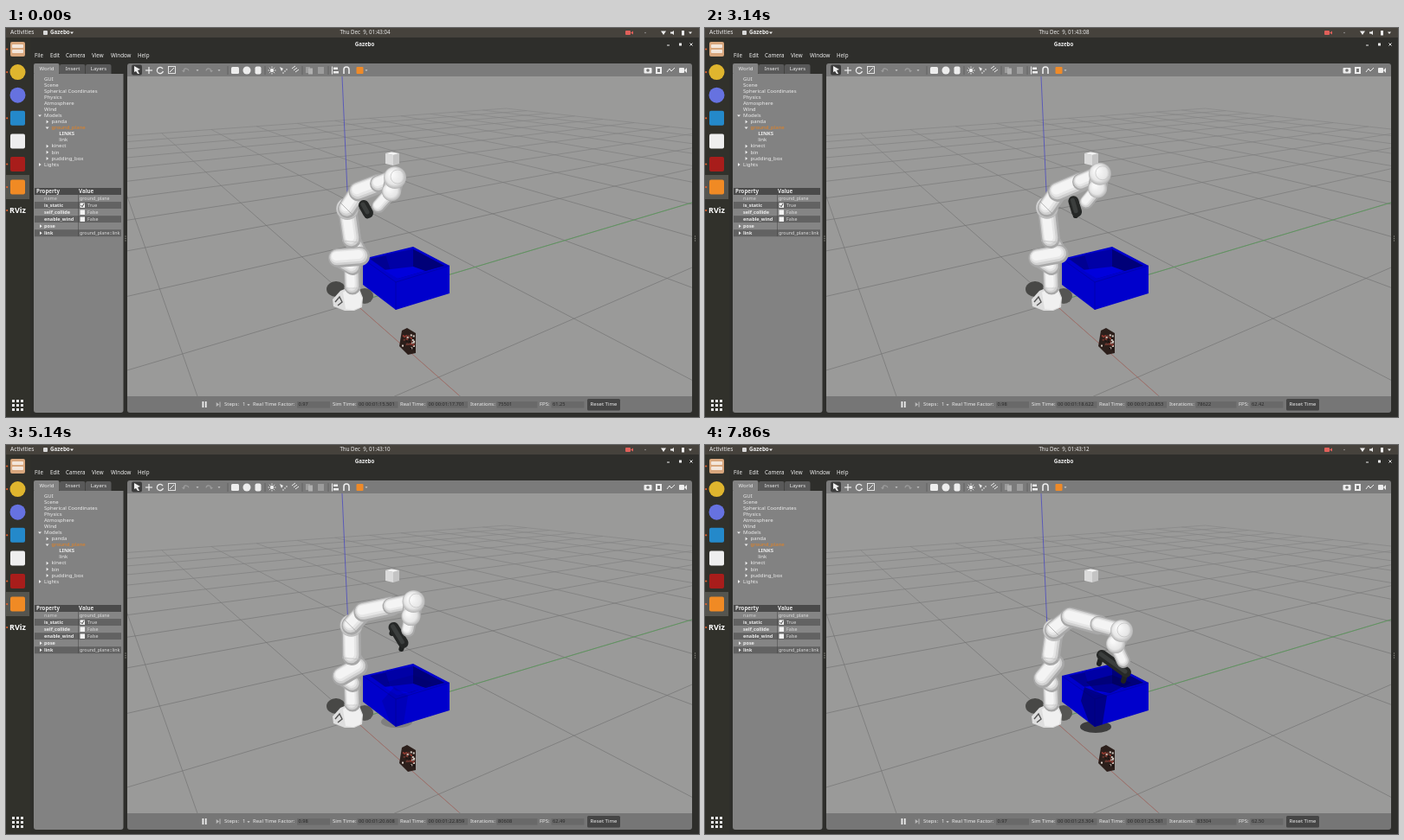
Write an HTML page with a canvas that moves like this. It is 800 by 450 pixels and loops after 8000 ms.

```html
<!DOCTYPE html>
<html lang="en">
<head>
<meta charset="utf-8">
<title>Robot simulation</title>
<style>
html, body { margin: 0; width: 100%; height: 100%; overflow: hidden; background: #2d2c29; }
canvas { display: block; }
</style>
</head>
<body>
<canvas id="stage" width="800" height="450"></canvas>
<script>
const c = document.getElementById('stage').getContext('2d');
const LOOP = 8000, STEP = 1000 / 7;
const FONT = '"Noto Sans", "Open Sans", sans-serif';
const LIGHT = '#ededed', DIM = '#9c9c9c';

// ---------- helpers ----------
const clamp = u => Math.max(0, Math.min(1, u));
const mix = (a, b, u) => a.map((v, i) => v + (b[i] - v) * u);
function rect(color, x, y, w, h) { c.fillStyle = color; c.fillRect(x, y, w, h); }
function path(p, close) {
  c.beginPath();
  for (let i = 0; i < p.length; i += 2) c.lineTo(p[i], p[i + 1]);
  if (close) c.closePath();
}
function poly(color, ...p) { path(p, true); c.fillStyle = color; c.fill(); }
function line(color, w, ...p) { path(p); c.strokeStyle = color; c.lineWidth = w; c.stroke(); }
function oval(color, x, y, rx, ry = rx) {
  c.beginPath(); c.ellipse(x, y, rx, ry, 0, 0, 7); c.fillStyle = color; c.fill();
}
function arc(color, w, x, y, r, from, to) {
  c.beginPath(); c.arc(x, y, r, from, to); c.strokeStyle = color; c.lineWidth = w; c.stroke();
}
function round(color, x, y, w, h, r) {
  c.beginPath(); c.roundRect(x, y, w, h, r); c.fillStyle = color; c.fill();
}
function text(s, x, y, color = LIGHT, size = 6, weight = '', align = 'left') {
  c.font = `${weight} ${size}px ${FONT}`;
  c.textAlign = align; c.textBaseline = 'middle';
  c.fillStyle = color; c.fillText(s, x, y);
}
function arrow(x, y, down, color = LIGHT, r = 2) {
  if (down) poly(color, x - r, y - r / 2, x + r, y - r / 2, x, y + r * .7);
  else poly(color, x - r / 2, y - r, x + r * .8, y, x - r / 2, y + r);
}

// ---------- motion ----------
// Every joint moves from rest to a lifted point, then straight on to its place above the bin.
const REST = 2400, LIFTED = 3710, REACHED = 7860;
const joints = {
  left:   [[383, 266], [386, 266], [390, 270]],
  right:  [[409, 264], [408, 258], [404, 253]],
  elbow:  [[394, 209], [396, 206], [403, 214]],
  fore:   [[407, 189], [408, 190], [422, 199]],
  wrist:  [[449, 173], [465, 163], [481, 215]],
  link:   [[445, 189], [464, 181], [474, 230]],
  flange: [[430, 206], [454, 195], [483, 250]],
  handA:  [[413, 205], [442, 194], [458, 243]],
  handB:  [[418, 214], [444, 211], [486, 263]]
};
function poseAt(t) {
  const lift = clamp((t - REST) / (LIFTED - REST)) ** 1.5;
  const reach = clamp((t - LIFTED) / (REACHED - LIFTED));
  const pose = {};
  for (const [name, [rest, lifted, end]] of Object.entries(joints))
    pose[name] = mix(mix(rest, lifted, lift), end, reach);
  return pose;
}

// ---------- scene ----------
// Perspective of a ground point in metres, with the vanishing points on y = 38
function ground(x, y) {
  const p = -.235 * x, q = .174 * y, d = 1 + p + q;
  return [(402 + 85 * p + 1343 * q) / d, (318 + 38 * (p + q)) / d];
}
function grid() {
  const shade = c.createLinearGradient(0, 90, 0, 220);
  shade.addColorStop(0, '#868686'); shade.addColorStop(1, '#707070');
  for (let i = -10; i <= 10; i++) {
    const nearX = Math.min(10, (.87 + .174 * i) / .235);
    const nearY = Math.max(-10, (-.87 + .235 * i) / .174);
    if (nearX > -10) line(shade, .65, ...ground(-10, i), ...ground(nearX, i));
    if (nearY < 10) line(shade, .65, ...ground(i, nearY), ...ground(i, 10));
  }
  line('#b06a62', .7, 402, 318, 523, 425);
  line('#52a052', .7, 402, 318, 792, 202);
  line('#4040c4', .7, 388, 56, 397, 255);
}
function bin(t) {
  const u = clamp((t - 4300) / 3000);
  const outline = [412, 267, 470, 253, 512, 275, 512, 307, 450, 326, 412, 297];
  oval(`rgba(45,45,45,${u * .85})`, 451, 318 + 8 * u, 18, 7);
  poly('#0000cc', ...outline);
  poly('#000092', 420, 267, 470, 256, 506, 275, 452, 290);
  poly('#0000a6', 438, 262, 470, 256, 470, 276, 444, 281);
  poly('#000078', 470, 256, 506, 275, 484, 281, 470, 276);
  poly('#0000dc', 436, 280, 470, 276, 484, 281, 452, 290);
  line('#0000a2', .7, 412, 267, 450, 294, 512, 275);
  line('#0000a2', .7, 450, 294, 450, 326);
  c.save();
  path(outline, true); c.clip();
  poly(`rgba(0,0,90,${.6 * u})`, 452 - 14 * u, 280, 464, 290, 458, 328, 446, 328, 434, 296);
  poly(`rgba(0,0,80,${.5 * u})`, 440, 274, 470, 266, 492, 275, 468, 287, 450, 284);
  c.restore();
}
function smallBox() {
  poly('#2c1f1b', 457, 350, 463, 347, 473, 353, 473, 376, 464, 378, 454, 368);
  const speckles = ['#d9cfc6', '#8f3a30', '#1c1513', '#6b3830'];
  let seed = 7;
  const random = () => (seed = seed * 16807 % 2147483647) / 2147483647;
  for (let i = 0; i < 40; i++) {
    const x = 457 + 14 * random(), y = 350 + (x - 457) * .35 + 18 * random();
    rect(speckles[i % 4], x, y, 2, 2);
  }
}
function cube() {
  poly('#dadada', 438, 145, 447, 147, 447, 159, 438, 157);
  poly('#c4c4c4', 447, 147, 454, 145, 454, 157, 447, 159);
  poly('#f4f4f4', 438, 145, 445, 143.5, 454, 145, 447, 147);
}
function limb(a, b, w) {
  c.lineCap = 'round';
  ['#a8a8a8', '#d0d0d0', '#e6e6e6', '#f4f4f4'].forEach((color, i) => {
    const d = w * .03 * i;
    line(color, w * (1 - .18 * i), a[0] - d, a[1] - d, b[0] - d, b[1] - d);
  });
  c.lineCap = 'butt';
}
function knob([x, y], r) {
  const g = c.createRadialGradient(x - r * .3, y - r * .3, r * .2, x, y, r);
  g.addColorStop(0, '#f8f8f8'); g.addColorStop(.65, '#e6e6e6'); g.addColorStop(1, '#b4b4b4');
  oval(g, x, y, r);
}
function hand(a, b) {
  c.lineCap = 'round';
  const open = clamp(Math.hypot(b[0] - a[0], b[1] - a[1]) / 30);
  for (const [x, y] of [a, b]) line('#202221', 6, x, y, x - 3 * open, y + 10 * open);
  line('#262827', 12, ...a, ...b);
  line('#3b3e3d', 5, a[0] - 1, a[1] - 1, b[0] - 1, b[1] - 1);
  c.lineCap = 'butt';
}
function robotBase() {
  oval('#484846', 381, 302, 11, 9);
  oval('#555553', 414, 310, 10, 9);
  poly('#dedede', 377, 314, 386, 304, 398, 299, 408, 302, 412, 312, 411, 323, 402, 327, 391, 327, 378, 322);
  poly('#f0f0f0', 389, 306, 398, 300, 407, 303, 411, 313, 409, 323, 401, 326, 392, 325);
  line('#555', 1.4, 380, 317, 385, 311, 388, 317, 383, 321);
  limb([399, 274], [400, 299], 19);
  line('#c2c2c2', .7, 390, 301, 409, 301);
}
function robot(t) {
  const { left, right, elbow, fore, wrist, link, flange, handA, handB } = poseAt(t);
  const upper = [399, 244], mid = mix(fore, wrist, .55);
  robotBase();
  limb(left, [400, 276], 20);
  limb(right, upper, 20);
  limb(left, right, 22);
  limb(upper, elbow, 22);
  line('#bdbdbd', .7, 388, 246, 409, 248);
  knob(elbow, 13);
  limb(elbow, fore, 22);
  limb(fore, mid, 23);
  limb(mid, wrist, 20);
  line('#9e9e9e', .7, elbow[0] - 8, elbow[1] - 7, elbow[0] + 6, elbow[1] + 7);
  hand(handA, handB);
  limb(link, flange, 16);
  limb(wrist, link, 22);
  knob(link, 11);
  knob(wrist, 13);
  arc('#c0c0c0', .7, wrist[0] + 3, wrist[1] - 1, 8, 0, 7);
}
function scene(t) {
  c.save();
  c.beginPath(); c.rect(140, 56, 652, 370); c.clip();
  rect('#9a9a99', 140, 56, 652, 370);
  grid();
  bin(t);
  smallBox();
  cube();
  robot(t);
  c.restore();
}

// ---------- interface ----------
function topBars(t) {
  rect('#2e2e2b', 0, 0, 800, 450);
  rect('#46423c', 0, 0, 800, 11);
  text('Activities', 5, 5.5, LIGHT, 6.6);
  round('#d9d9d9', 43, 3, 5, 5, 1);
  text('Gazebo', 51, 5.5, LIGHT, 6.2, 'bold');
  arrow(76, 5.5, true);
  const seconds = String(Math.floor(4.86 + t / 1000)).padStart(2, '0');
  text('Thu Dec  9, 01:43:' + seconds, 414.5, 5.5, LIGHT, 6.2, '', 'center');
  round('#e0605a', 715, 3, 6, 5, 1);
  poly('#e0605a', 721, 5.5, 724, 3.5, 724, 7.5);
  oval('#aaa', 738, 5.5, .7);
  poly(LIGHT, 756, 3.5, 762, 3.5, 759, 8);
  poly(LIGHT, 767, 4.5, 769, 4.5, 771, 3, 771, 8, 769, 6.5, 767, 6.5);
  rect(LIGHT, 780, 3, 3, 5.5);
  arrow(790, 5.5, true);
  text('Gazebo', 414, 19, LIGHT, 6.2, 'bold', 'center');
  rect(LIGHT, 763, 19.5, 3, 1);
  rect(LIGHT, 777, 17.5, 3, 3);
  line(LIGHT, 1, 789.5, 17.5, 792.5, 20.5); line(LIGHT, 1, 792.5, 17.5, 789.5, 20.5);
  [['File', 33], ['Edit', 51], ['Camera', 69], ['View', 99], ['Window', 121], ['Help', 152]]
    .forEach(([s, x]) => text(s, x, 32, LIGHT, 6.2));
}
function dock() {
  rect('#31312b', 0, 11, 28, 439);
  rect('#55554f', 0, 170, 27, 28);
  ['#d8a77d', '#dfb52e', '#6672e0', '#2489ca', '#eeeeee', '#a81d1b', '#f08a24'].forEach((color, i) => {
    const y = 24.5 + i * 26.6;
    if (i === 1 || i === 2) oval(color, 13.5, y, 9);
    else round(color, 5, y - 8.5, 17, 17, 2);
    if (i !== 2 && i !== 4) oval('#e2622e', 1.2, y, 1.1);
  });
  for (const y of [19, 25]) round('#f3e6da', 7, y, 13, 4, 1);
  text('RViz', 13.5, 211, '#fff', 9, 'bold', 'center');
  oval('#e2622e', 1.2, 211, 1.1);
  for (let i = 0; i < 9; i++) rect('#e6e6e6', 7 + i % 3 * 5, 430 + (i / 3 | 0) * 5, 3, 3);
}
function tree() {
  // Two spaces of indent per level; the mark tells open from closed
  ['  GUI', '  Scene', '  Spherical Coordinates', '  Physics', '  Atmosphere', '  Wind', 'v Models',
   '  > panda', '  v ground_plane', '      LINKS', '      link', '  > kinect', '  > bin',
   '  > pudding_box', '> Lights'].forEach((row, i) => {
    const [, lead, label] = row.match(/^([ v>]+)(.*)$/);
    const x = 44 + (lead.length - 2) * 4.3, y = 59 + i * 7.07;
    text(label, x, y, label === 'ground_plane' ? '#e8821e' : LIGHT, 6, label === 'LINKS' ? 'bold' : '');
    if (lead.trim()) arrow(x - 5, y, lead.includes('v'));
  });
}
function properties() {
  rect('#4a4a4a', 33, 185, 100, 8);
  text('Property', 35, 189, LIGHT, 6.2, 'bold');
  text('Value', 84, 189, LIGHT, 6.2, 'bold');
  [['name', 'ground_plane'], ['is_static', 'True'], ['self_collide', 'False'],
   ['enable_wind', 'False'], ['pose', ''], ['link', 'ground_plane::link']].forEach(([key, value], i) => {
    const y = 197 + i * 8.05, isFlag = /True|False/.test(value), faint = key === 'name';
    rect(i % 2 ? '#626262' : '#858585', 33, y - 4, 100, 8);
    if (i > 3) arrow(40, y, false);
    text(key, 44, y, faint ? '#cfcfcf' : LIGHT, 5.5, faint ? '' : 'bold');
    text(value, isFlag ? 94 : 85, y, '#dedede', 5.3);
    if (isFlag) rect('#f4f4f4', 85.5, y - 2.7, 5.5, 5.5);
    if (value === 'True') line('#333', .9, 86.5, y, 88, y + 1.7, 90.2, y - 2);
  });
  line('#4c4c4c', .6, 83.5, 185, 83.5, 241);
}
function sidePanel() {
  ['World', 'Insert', 'Layers'].forEach((label, i) => {
    const x = 32 + i * 30;
    round(i ? '#595959' : '#828282', x, 41 + (i && 1), 29.5, 13, 2);
    text(label, x + 15, 47.5, LIGHT, 6, '', 'center');
  });
  round('#828282', 32, 53, 103.5, 392, [0, 0, 3, 3]);
  tree();
  properties();
  for (const x of [138, 795.5]) for (let y = 241; y < 248; y += 2.5) oval('#85857f', x, y, .7);
}
function toolbar() {
  round('#7b7b7b', 140, 41, 652, 16, [3, 3, 0, 0]);
  for (const x of [256, 299, 342, 372]) line('#5f5f5f', .8, x, 44, x, 54);
  for (const x of [221, 246, 416]) arrow(x, 49, true, '#ccc', 1.5);
  // Select, move, rotate, scale
  round('#3d3d3d', 145, 42.5, 12, 12, 2);
  poly(LIGHT, 148, 44, 155, 48, 152, 49, 154, 53, 152, 53, 150, 50, 148, 51);
  line(LIGHT, 1.2, 161, 49, 169, 49); line(LIGHT, 1.2, 165, 45, 165, 53);
  arc(LIGHT, 1.3, 178, 49, 3.6, .3, 5.7);
  c.lineWidth = .9; c.strokeRect(187.5, 44.5, 8, 8); line(LIGHT, 1, 189, 51, 194, 46);
  // Undo and redo
  for (const side of [-1, 1]) {
    arc(DIM, 1.2, 221 + 13 * side, 50, 3, 3.3, 6.1);
    arrow(221 + 16 * side, 50, true, DIM);
  }
  // Solids
  round(LIGHT, 260, 45, 9, 8, 1.5);
  oval(LIGHT, 278, 49, 4.5);
  round(LIGHT, 287.5, 44.5, 7, 9, 2);
  // Lights
  oval(LIGHT, 307, 49, 2.2);
  for (let a = 0; a < 6.2; a += Math.PI / 4) {
    const x = Math.cos(a), y = Math.sin(a);
    line(LIGHT, .9, 307 + 3 * x, 49 + 3 * y, 307 + 4.5 * x, 49 + 4.5 * y);
  }
  poly(LIGHT, 316, 45, 320, 47, 318, 50);
  for (let i = 0; i < 6; i += 2) {
    oval(LIGHT, 320 + i, 52 - i, .8);
    line(LIGHT, 1, 330 + i, 47 + i, 334 + i, 44 + i);
  }
  // Clipboard, align, snap, view
  rect(DIM, 346, 45, 5, 7); rect('#b0b0b0', 349, 46.5, 5, 7); rect(DIM, 360, 45, 7, 8);
  line(LIGHT, 1, 376.5, 44.5, 376.5, 53.5);
  rect(LIGHT, 378, 45.5, 5, 2.5); rect(LIGHT, 378, 50, 6, 2.5);
  arc(LIGHT, 1.6, 393, 48, 3, Math.PI, 0);
  for (const x of [390, 396]) line(LIGHT, 1.6, x, 48, x, 53);
  round('#ef8a28', 404.5, 45, 8, 8, 1);
  // Capture tools
  round(LIGHT, 736.5, 46, 9, 6.5, 1); oval('#777', 741, 49, 1.8);
  rect(LIGHT, 750, 45, 7, 8); rect('#777', 752, 47, 3, 4);
  line(LIGHT, 1, 763, 51, 766, 47, 768, 50, 772, 46);
  round(LIGHT, 777, 46, 6, 6, 1); poly(LIGHT, 783, 49, 786, 46, 786, 52);
}
function statusBar(t) {
  const s = t / 1000, y = 435.5;
  const sim = 15.501 + s * .993, real = 17.7 + s * 1.003;
  const factor = .97 + .015 * Math.sin(Math.PI * t / LOOP);
  const fps = 62.5 - 1.25 * Math.exp(-s / 1.13);
  const stamp = v => '00 00:01:' + v.toFixed(3);
  round('#767676', 140, 426, 652, 19, [0, 0, 3, 3]);
  for (const x of [226.5, 229.8]) rect(LIGHT, x, 432, 1.8, 7);
  arrow(244, y, false, '#bbb', 2.5); rect('#bbb', 246.5, 432.5, 1, 6);
  text('Steps:', 252, y); text('1', 273, y); arrow(280, 436, true, '#ddd', 1.6);
  [['Real Time Factor:', 285, 336, factor.toFixed(2)],
   ['Sim Time:', 377, 405.5, stamp(sim)],
   ['Real Time:', 455, 486, stamp(real)],
   ['Iterations:', 536, 566.5, Math.round(sim * 1000) + 60000],
   ['FPS:', 616, 629.5, fps.toFixed(2)]].forEach(([label, x, field, value], i) => {
    text(label, x, y);
    rect('#696969', field, 432, i % 4 ? 47 : 38, 7.5);
    text(value, field + 1.5, y, '#282828', 5.7);
  });
  round('#454545', 671, 429, 38, 13.5, 1.5);
  text('Reset Time', 690, y, LIGHT, 6, '', 'center');
}

// ---------- loop ----------
const start = performance.now();
function tick() {
  const elapsed = (performance.now() - start) % LOOP;
  const t = Math.floor(elapsed / STEP + .03) * STEP + .5;
  topBars(t);
  dock();
  sidePanel();
  toolbar();
  scene(t);
  statusBar(t);
  requestAnimationFrame(tick);
}
tick();
</script>
</body>
</html>
```
